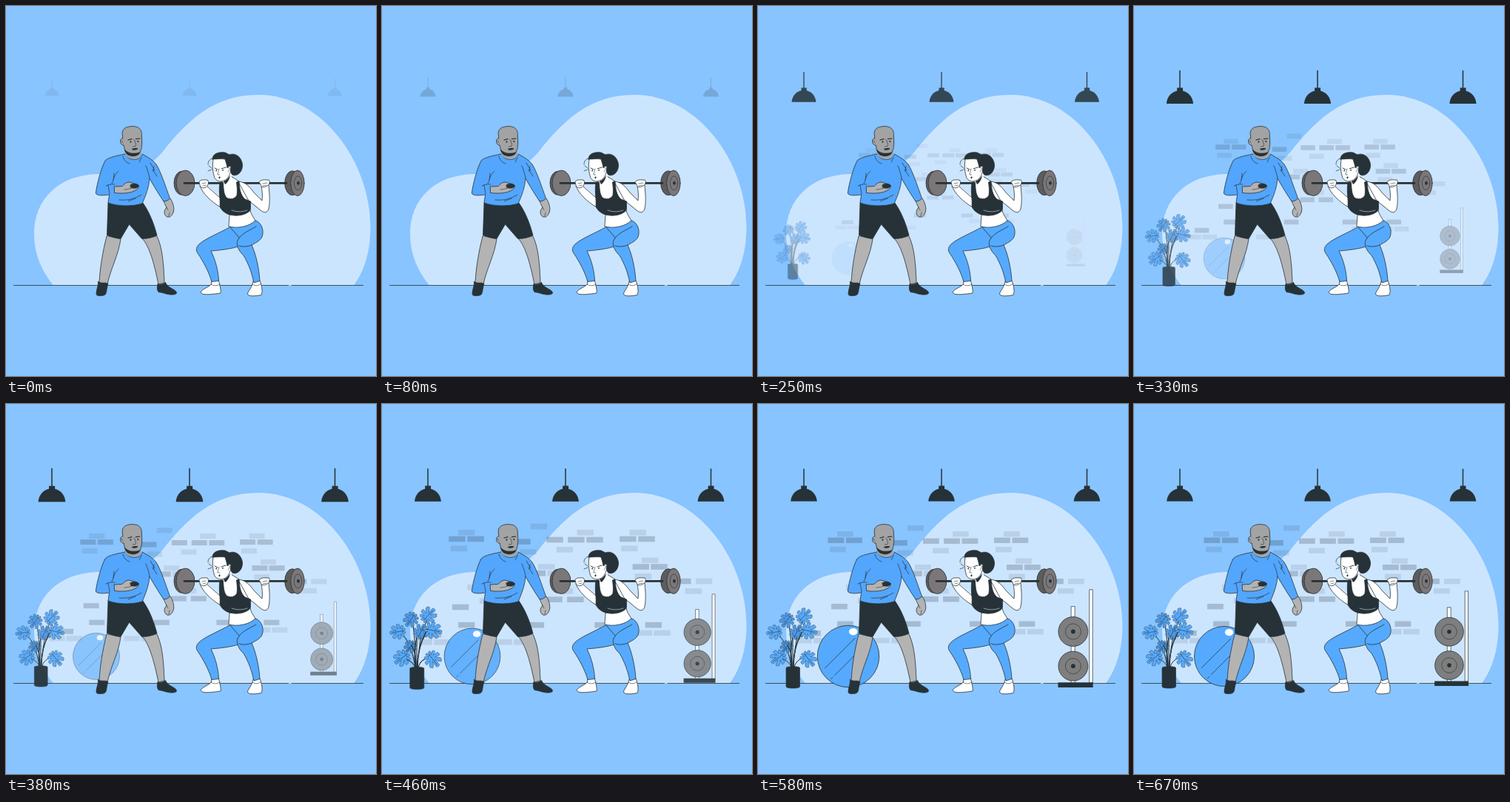
An HTML page with a canvas for the animation above (710 ms loop, 500 px wide and 500 px high).

```html
<!DOCTYPE html>
<html lang="en">
<head>
<meta charset="utf-8">
<title>Squat training</title>
<style>
  html, body { margin: 0; width: 100%; height: 100%; overflow: hidden; background: #88c4ff; }
  canvas { display: block; width: 500px; height: 500px; }
</style>
</head>
<body>
<canvas id="stage" width="500" height="500"></canvas>
<script>
const LOOP = 710, FPS = 24, LEAD = 30, POP = 500;
const SKY = '#88c4ff', HAZE = '#cce5ff', BLUE = '#55aaff', SHIRT = '#53a6fd';
const INK = '#263238', SKIN = '#b3b3b3', FACE = '#a3a3a3', IRON = '#7b7778';

const stage = document.getElementById('stage').getContext('2d');
const makeLayer = () => {
  const c = document.createElement('canvas');
  c.width = c.height = 500;
  return c.getContext('2d');
};
const layer = makeLayer(), people = makeLayer();
let g = stage;

function shape(d, fill, stroke = INK, width = 0.8) {
  const path = new Path2D(d);
  if (fill) { g.fillStyle = fill; g.fill(path); }
  if (stroke) { g.strokeStyle = stroke; g.lineWidth = width; g.stroke(path); }
}
const line = (d, width = 0.8, color = INK) => shape(d, null, color, width);
function oval(x, y, rx, ry, fill, stroke = INK, width = 0.8) {
  g.beginPath();
  g.ellipse(x, y, rx, ry, 0, 0, Math.PI * 2);
  if (fill) { g.fillStyle = fill; g.fill(); }
  if (stroke) { g.strokeStyle = stroke; g.lineWidth = width; g.stroke(); }
}

// Overshooting ease: cubic-bezier(.36, -.01, .5, 1.38)
function ease(x) {
  if (x <= 0) return 0;
  if (x >= 1) return 1;
  const bez = (a, b, p) => 3 * (1 - p) ** 2 * p * a + 3 * (1 - p) * p * p * b + p ** 3;
  let lo = 0, hi = 1;
  for (let i = 0; i < 24; i++) {
    const mid = (lo + hi) / 2;
    if (bez(0.36, 0.5, mid) < x) lo = mid; else hi = mid;
  }
  return bez(-0.01, 1.38, lo);
}

// Draws a group that grows from half size while it fades in.
function pop(time, delay, cx, cy, draw) {
  const e = ease((time - delay) / POP);
  if (e <= 0) return;
  const s = 0.5 + e / 2;
  g = layer;
  g.clearRect(0, 0, 500, 500);
  g.save();
  g.translate(cx, cy);
  g.scale(s, s);
  g.translate(-cx, -cy);
  draw();
  g.restore();
  g = stage;
  g.globalAlpha = Math.min(1, e);
  g.drawImage(layer.canvas, 0, 0);
  g.globalAlpha = 1;
}

function backdrop() {
  g.fillStyle = SKY;
  g.fillRect(0, 0, 500, 500);
  shape('M64 377.5C48 358 38 335 38 308C38 262 70 228 125 227C165 226 190 222 210 199C245 155 280 120 341 120C429 120 492.5 213 492.5 298C492.5 333 484 358 470 377.5Z', HAZE, null);
  line('M10 377.5H382M385.5 377.5H483', 0.8);
}

function lamp(x) {
  line(`M${x} 87.5V112`, 1.5);
  shape(`M${x - 3.8} 110.6H${x + 4}V115H${x - 3.8}Z
    M${x - 17.8} 131.5C${x - 17} 121 ${x - 9} 114.2 ${x} 114.2S${x + 17} 121 ${x + 17.8} 131.5Z`, INK, null);
}

// Each row: top edge, then the left edges of its bricks.
const darkRows = [[180.5, 94.5, 119, 319, 343.5], [181.5, 223, 251, 275.5], [184, 180],
  [217, 336, 360], [225.5, 200], [236, 391], [260, 222, 250], [270, 99],
  [293.5, 107, 198, 286, 352.5], [306, 63]];
const lightRows = [[164, 202], [172, 107, 263, 332], [193, 97, 321], [194.5, 236], [197.5, 188],
  [208.5, 348], [217, 212], [225.5, 224], [229.5, 339], [236, 419], [244, 119], [249, 236, 405],
  [262, 135], [304, 300, 340, 364], [316, 51, 75, 156, 180]];
function bricks() {
  const lay = (rows, color) => {
    g.fillStyle = color;
    for (const [y, ...xs] of rows) for (const x of xs) g.fillRect(x, y, 21.8, 7.4);
  };
  lay(darkRows, 'rgba(38,50,56,.23)');
  lay(lightRows, 'rgba(38,50,56,.11)');
}

// Split leaf: a heart outline with deep, narrow cuts towards its rib.
function leaf(x, y, size, turn, fill = BLUE) {
  g.save();
  g.translate(x, y);
  g.rotate(turn);
  g.beginPath();
  for (let i = 0; i <= 140; i++) {
    const a = i / 140 * Math.PI * 2;
    const cut = Math.abs(Math.cos(a * 4.5)) < 0.999 ? Math.abs(Math.sin(a * 4.5)) ** 8 : 0;
    const r = size * (0.86 + 0.26 * Math.cos(a)) * (1 - 0.62 * cut);
    g.lineTo(r * Math.cos(a), r * Math.sin(a) * 0.92);
  }
  g.closePath();
  g.fillStyle = fill;
  g.fill();
  g.strokeStyle = INK;
  g.lineWidth = 0.4;
  g.stroke();
  line(`M${-size * 0.4} 0H${size * 0.95}`, 0.6);
  g.restore();
}

function plant() {
  line('M46 356C44 335 46 315 41 296M47 356C50 330 52 310 61 292M45 356C42 335 36 318 26 311M48 356C48 335 53 315 63 308M45 356C43 349 38 347 32 344M49 356C50 349 56 344 64 342M47 356V316', 1);
  leaf(40, 326, 10, 2.2, '#4692de');
  leaf(41, 290, 12, 2.2, '#4b9bec');
  leaf(60, 289, 13, -0.8);
  leaf(25, 308, 12, 3);
  leaf(51, 311, 12, -1.1, '#4b9bec');
  leaf(65, 306, 13.5, 0.2);
  leaf(30, 341, 13, 2.5);
  leaf(66, 342, 13.5, 0.9);
  line('M45 355C43 338 45 324 47 316M48 355C48 334 53 320 59 309M46 355C46 340 43 331 40 326', 1.2);
  shape('M38 356.5C38 354.2 56.5 354.2 56.5 356.5V382C56 384.8 38.5 384.8 38 382Z', INK, INK, 0.6);
}

function ball() {
  oval(122, 341, 40.4, 40.4, BLUE);
  line('M91 357L131 317M99 371L102 368M104 366L132 338', 0.7);
  oval(128.5, 308.7, 5.6, 4.6, '#fff', null);
}

function rack() {
  shape('M423.3 275H428.2V375H423.3ZM447.2 253H451.5V375H447.2Z', '#fff', INK, 0.7);
  shape('M406.2 374.4H452V380.8H406.2Z', INK, null);
  for (const y of [307.8, 353]) {
    oval(426, y, 19.3, 19.3, '#7e7e7e');
    oval(426, y, 10.2, 10.2, null, INK, 0.6);
    oval(426, y, 2.8, 2.8, INK, null);
  }
}

function trainer() {
  shape('M136 311C130 335 127 355 126 374L137 376C142 353 152 337 155 315Z', SKIN);
  shape('M184 314C194 325 200 347 206 376L214 374C213 345 211 326 204 311Z', SKIN);
  shape('M124.5 372.5C125 379 122 383 122 389C122 392 127 392 132 391C137 390 135 383 138 375.5C134 372.5 129 376 124.5 372.5Z', INK);
  shape('M205 376C204 380 204 384 206 386.5C212 387 216 389.5 222 390C228 390.5 231 389 230.5 387C228 382 218 381 215.5 373.5C212 376.5 208 376.5 205 376Z', INK);
  shape('M138 266L136.5 309.5C142 312 149 314 155 314.5L166.5 295L183.5 314.5C191 314.5 198 313 204 310C200 294 194 279 185 266Z', INK);
  shape('M213 263L222 260C226 266 228 274 226 279C224 284 221 286 218 285C215 284 213 280 214.5 276L217 272C215 269 214 266 213 263Z', SKIN);
  line('M217 272L219 276M221 279L220 284', 0.6);
  shape('M161 200C152 202 139 204 134 209C128 221 123 240 121.3 253C123 257 134 256 139.5 255L138 266C151 271 171 271 184 267C189 256 193 245 194 233C200 244 207 255 213 264C217 264 220 262 221.5 260C216 245 209 223 203 214C198 207 190 204 184.5 200C181 211 164 209 161 200Z', SHIRT);
  line('M194 233C193 226 191 221 189 216M140 254L138 242M152 223C146 228 146 234 143 240M146 226L145 235M135 243C142 240 144 241 147 241M153 262C163 263 174 261 183 255M165 264L175 260M158 203C159 208 162 211 167 213M180 211L183 205M195 212L201 222M198 221L204 230M200 217L199 223', 0.7);
  shape('M146.5 244L157 243.5C161 239 165 237 168 238.5C173 239.5 178 241 179 243C180 246 176 249 172 250.5C166 253.5 154 253.5 147 252.5Z', SKIN);
  shape('M168 242C171 239.5 177 240 179.5 242.5C179 246 174 247 169 245.5Z', INK);
  line('M160 248C164 248 167 247 170 246', 0.6);
  shape('M160 190L161 201C165 208 179 208 183 201L181 190Z', FACE, null);
  shape('M157.2 173C156.5 166 162 163 170 162.6C179 162.4 184 166 183.4 176C184 183 184 192 181.5 197C179 203 168 204 163 199C160 196 160 192 159.3 188C154 189 152.5 179 157.5 179Z', FACE);
  shape('M160 193C164 198 170 200.5 181.5 197.5C180 202 174 204 169 202.8C163 202 161 198 160 193Z', INK, null);
  line('M165 181L170 179.6M175.5 179.6L181 179', 1.1);
  oval(168.5, 183.5, 0.9, 1.3, INK, null);
  oval(178.3, 183, 0.9, 1.3, INK, null);
  line('M173.5 181C174.5 185 176.5 187.5 175 189.4L171.5 189.8M156 182L158 185', 0.65);
  shape('M169.5 193.5C173 191.7 176 192 178.5 192.5C177 195 172 195.5 169.5 193.5Z', INK, null);
}

function barbell() {
  oval(237.5, 239.3, 10.5, 16, '#5f5c5e');
  oval(242.5, 239.3, 12.5, 17.2, IRON);
  oval(387, 239.3, 10.3, 16.5, '#5f5c5e');
  line('M241 239.3H379', 2.7);
  oval(394, 239.3, 9.2, 17.2, IRON);
  oval(394.5, 239.3, 5.2, 9.5, null, INK, 0.6);
  oval(395, 239.3, 1.8, 2.5, INK, null);
}

function athlete() {
  shape('M278 371L277.5 376C272 381 264 383 263.5 387C263.5 391 276 390 290 388C291 384 289 379 287.5 371Z', '#fff');
  shape('M334 372C333 380 327 385 326.5 389C327 393 338 392 345 390.5C347 386 346 379 343 371Z', '#fff');
  line('M277 376C281 379 286 378 289 376M333 376C337 379 342 378 345 375', 0.6);
  shape('M302 299C290 306 270 314 262 321C257 325 256 330 259 334C267 346 274 359 278 372.5L287.5 371.5C287 358 283 343 277 331C290 330 305 328 314 325L330 300Z', BLUE);
  const nearLeg = 'M302 298L338 290C346 294 349 304 346 312C343 318 337 320 332 323C338 336 342 355 343 371.5L335 374C332 360 328 349 321 337C313 330 310 320 314 315';
  shape(nearLeg + 'L302 300Z', BLUE, null);
  line(nearLeg + 'C319 307 328 304 338 298M303 299C307 304 311 308 315 313M315 324C321 326 327 325 332 323');
  // torso and arms
  shape('M291 236C289 245 288 260 290 270L302 281C302 288 301 293 301 298C314 301 328 298 337 290C335 286 331 282 330 276L330 262L315 237L304 230Z', '#fff');
  shape('M262 243L268 254L279 265L290 272L289 258L273 244Z', '#fff', null);
  line('M262 243C265 252 276 264 290 272M272 244L289 259');
  shape('M314 237C324 238 329 244 335 252L346 263C347 256 346 249 345 243L355 242C356 252 357 265 355 274C353 280 349 280 344 276L328 263Z', '#fff');
  shape('M289 239L293.5 237C294 247 294 254 298 259C303 262 309 261 312 256C313 249 312 243 311.5 238L315 237C315.5 247 317 256 323 261L330.5 264C330 269 331 273 329.5 277C321 284 310 284 302 282C296 280 291 276 289 271C290 260 287 250 289 239Z', INK);
  line('M305 276C313 279 321 278 326 276', 0.6, '#dfe6ea');
  shape('M261 238C262 234 267 235 272 235C275 238 273 243 270 245C266 247 262 245 262 242Z', '#fff');
  line('M265 240L270 239M266 243L270 242', 0.6);
  shape('M342 238C344 234 350 235 355 235C358 238 355 243 351 244C347 246 344 244 344 241Z', '#fff');
  line('M347 240L353 239M347 243L352 242', 0.6);
  // head
  shape('M303 218L305 233C303 239 297 241 292 237Z', '#fff', null);
  shape('M294 236.8C298 235.5 301 232 303 229C302 235 299 239 296 241Z', INK, null);
  shape('M280 207C279 214 279 223 281 229C282 236 289 238 293 236.5C299 235 303 229 304 220L302 205Z', '#fff');
  shape('M279 207C279 199 288 197 296 198L302 201C309 198 318 203 319.5 214C320 223 314 230 307 228.5C303 227 303 221 304.5 217C301 216 300 217 299 219C298.5 214 297 211 296 207C290 206 285 207 279 207Z', INK);
  line('M282 219L286 221M291 220L297 218', 0.9);
  oval(284.2, 222.4, 0.8, 1.1, INK, null);
  oval(293, 221.8, 0.8, 1.1, INK, null);
  line('M288 220C287.5 224 285.5 226 286 228L288.5 228M300 218C303 217 303 222 300 224', 0.6);
  oval(288.5, 231.8, 1.1, 1.4, INK, null);
  line('M279 206C275 207 273 210 273 214M274 216L278 219M273 223L278 221', 0.7);
}

g = people;
g.lineJoin = g.lineCap = 'round';
trainer();
barbell();
athlete();
g = stage;

function render() {
  const t = (performance.now() - start) % LOOP;
  const step = Math.min(16, Math.max(1, Math.floor((t + 5) * FPS / 1000)));
  const time = step * 1000 / FPS + LEAD;
  backdrop();
  for (const x of [62, 248, 444.5]) pop(time, 0, x, 109.5, () => lamp(x));
  pop(time, 100, 245, 246, bricks);
  pop(time, 100, 46.5, 331, plant);
  pop(time, 200, 122, 341, ball);
  pop(time, 200, 429, 317, rack);
  g.drawImage(people.canvas, 0, 0);
  requestAnimationFrame(render);
}
const start = performance.now();
render();
</script>
</body>
</html>
```
